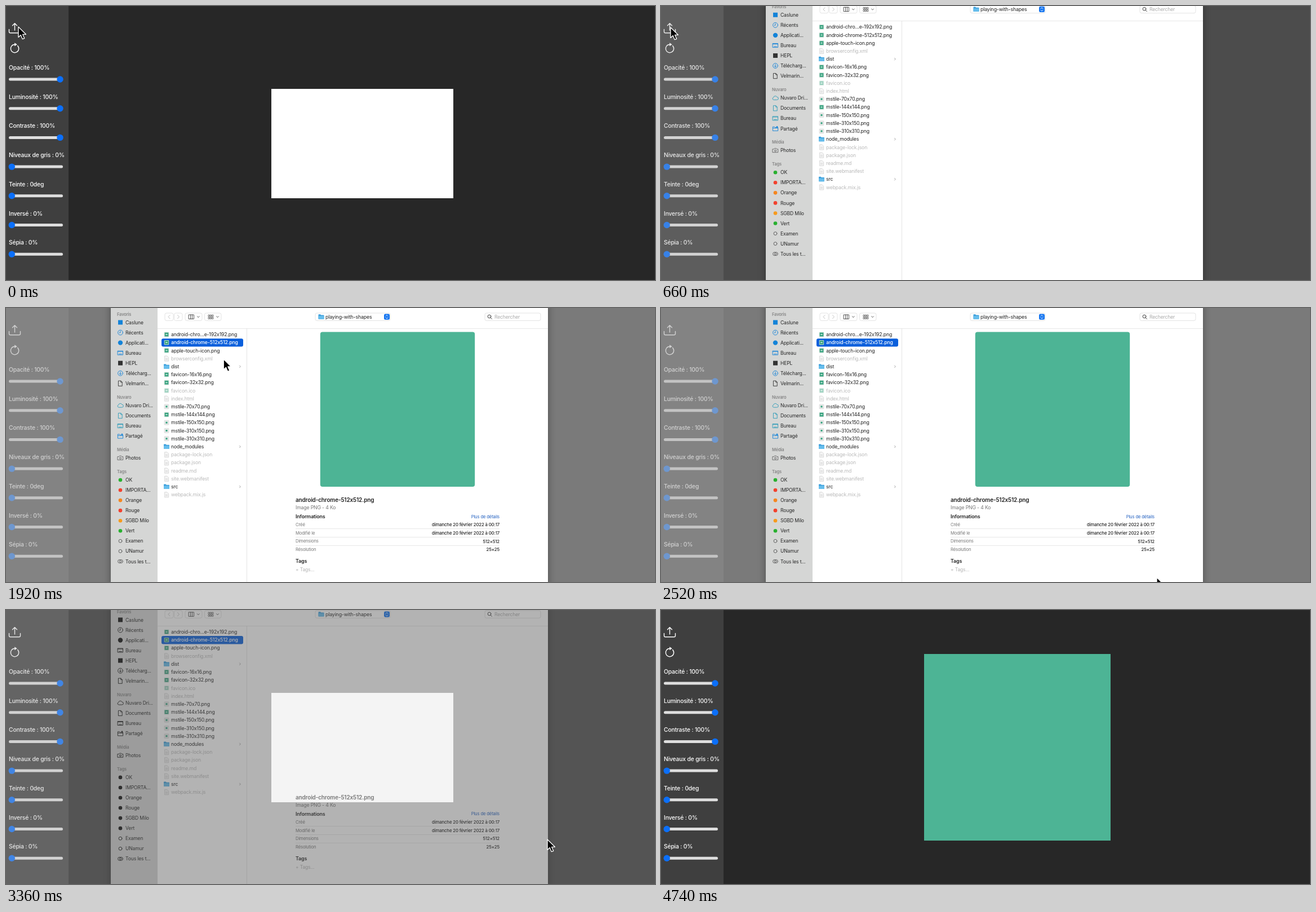
An HTML page that plays this animation: 1152x486 px, repeating every 4800 ms.

```html
<!DOCTYPE html>
<html lang="fr">
<head>
<meta charset="utf-8">
<style>
html, body { margin: 0; width: 100%; height: 100%; overflow: hidden; background: #272727; }
svg { display: block; width: 1152px; height: 486px; font-family: Inter, Roboto, sans-serif; letter-spacing: -.01em; }
text { white-space: pre; }
.line { fill: none; stroke: currentColor; stroke-width: .9; stroke-linecap: round; stroke-linejoin: round; }
.bold .line { stroke-width: 1.4; }
.closing .icon { color: #111 !important; }
</style>
</head>
<body>
<svg id="stage" viewBox="0 0 1152 486"></svg>
<script>
const stage = document.getElementById('stage');

// y is the middle of the capitals
const text = (x, y, s, size, fill, extra = '') =>
  `<text x="${x}" y="${(y + size * .36).toFixed(2)}" font-size="${size}" fill="${fill}" ${extra}>${s}</text>`;
const rect = (x, y, w, h, fill, r = 0, extra = '') =>
  `<rect x="${x}" y="${y}" width="${w}" height="${h}" rx="${r}" fill="${fill}" ${extra}/>`;
const circle = (x, y, r, fill, extra = '') => `<circle cx="${x}" cy="${y}" r="${r}" fill="${fill}" ${extra}/>`;
const line = (d, extra = '') => `<path class="line" d="${d}" ${extra}/>`;
const at = (x, y, s, extra = '') => `<g transform="translate(${x} ${y})" ${extra}>${s}</g>`;
const bold = 'font-weight="600"';
const right = 'text-anchor="end"';

function controls() {
  const sliders = [['Opacité : 100%', 1], ['Luminosité : 100%', 1], ['Contraste : 100%', 1],
    ['Niveaux de gris : 0%', 0], ['Teinte : 0deg', 0], ['Inversé : 0%', 0], ['Sépia : 0%', 0]];
  const icons = line('M5.5 41.5v4q0 2.2 2.2 2.2h15.6q2.2 0 2.2-2.2v-4M15.5 43V31M11.5 34.8l4-4 4 4') +
    line('M20.6 70.4A7.2 7.2 0 1 1 15.5 68.3') +
    '<path d="M15.2 65.3l4.6 2.9-4.6 3z" fill="#fff"/>';
  return rect(0, 0, 111, 486, '#3f3f3f') + `<g class="bold" color="#fff">${icons}</g>` +
    sliders.map(([label, full], i) => {
      const y = 109.3 + i * 51.7;
      return text(5, y, label, 10.3, '#fff', 'font-weight="450"') + rect(5, y + 18.2, 96, 5, '#dedede', 2.5) +
        circle(full ? 96 : 10.3, y + 20.7, 5.7, '#0b6ffa');
    }).join('');
}

const icons = {
  square: rect(-4, -4, 8, 8, 'currentColor'),
  disc: circle(0, 0, 4.2, 'currentColor'),
  dot: circle(0, 0, 3.3, 'currentColor'),
  ring: circle(0, 0, 2.9, 'none', 'class="line"'),
  rings: circle(-1.4, 0, 3, 'none', 'class="line"') + circle(1.4, 0, 3, 'none', 'class="line"'),
  clock: circle(0, 0, 4.4, 'none', 'class="line"') + line('M0-2.6V.4H-2'),
  down: circle(0, 0, 4.4, 'none', 'class="line"') + line('M0-2.4V2.2M-1.8.5L0 2.3 1.8.5'),
  desk: line('M-4.5-3.5h9v7h-9zM-4.5-2.4h9M-2.5 2h5'),
  page: line('M-3.2-4.6h4l2.4 2.5v6.7h-6.4zM.8-4.6v2.5h2.4'),
  cloud: line('M-3 3.2a2.2 2.2 0 0 1-.3-4.3 3.3 3.3 0 0 1 6.2-.6A2.4 2.4 0 0 1 3 3.2z'),
  share: line('M-4.6 3.6v-6.8h3l1 1.2h5.2v5.6zM-4.6-.8h9.2') + circle(3, -3.2, 1.3, 'currentColor'),
  camera: line('M-4.7-2.4h2.2l1-1.3h3l1 1.3h2.2v5.8h-9.4z') + circle(0, .4, 1.6, 'none', 'class="line"')
};

function sidebar() {
  const blue = '#1383d8', teal = '#2b9bb8', dark = '#333', red = '#f2412d', green = '#28b02f', orange = '#f79a1c';
  const groups = [
    [11, 'Favoris', [['square', blue, 'Caslune'], ['clock', blue, 'Récents'], ['disc', blue, 'Applicati...'],
      ['desk', blue, 'Bureau'], ['square', dark, 'HEPL'], ['down', blue, 'Télécharg...'], ['page', dark, 'Velmarin...']]],
    [158.5, 'Nuvaro', [['cloud', teal, 'Nuvaro Dri...'], ['page', teal, 'Documents'], ['desk', teal, 'Bureau'], ['share', blue, 'Partagé']]],
    [251.5, 'Média', [['camera', '#666', 'Photos']]],
    [290.5, 'Tags', [['dot', green, 'OK'], ['dot', red, 'IMPORTA...'], ['dot', '#f5861f', 'Orange'], ['dot', red, 'Rouge'],
      ['dot', orange, 'SGBD Milo'], ['dot', green, 'Vert'], ['ring', '#555', 'Examen'], ['ring', '#555', 'UNamur'],
      ['rings', '#555', 'Tous les t...']]]
  ];
  return rect(186, -40, 83, 580, '#d5d6d5') + groups.map(([y, title, items]) =>
    text(197, y, title, 7.5, '#858585', bold) + items.map(([icon, color, label], i) => {
      const iy = y + 14.5 + i * 18.05;
      return at(203, iy, icons[icon], `class="icon" style="color:${color}"`) + text(212, iy, label, 8.6, '#262626');
    }).join('')).join('');
}

const folder = '<path d="M-5-3.6q0-.8.8-.8h2.8l1.2 1.2h4.4q.8 0 .8.8v5.6q0 .8-.8.8h-8.4q-.8 0-.8-.8z" fill="#3c9fdc"/>' +
  rect(-5, -1.8, 10, 5.8, '#66bdec', .7);
const fileIcons = {
  p: rect(-4.2, -4.2, 8.4, 8.4, '#b9d5ca', 1) + rect(-3.2, -3.2, 6.4, 6.4, '#35a27e') + rect(-1.6, -.9, 3.2, 1.8, '#c6e6da'),
  s: rect(-4, -4, 8, 8, '#e6e9e8', 1, 'stroke="#ccc" stroke-width=".5"') + rect(-1.5, -1.5, 3, 3, '#35a27e'),
  d: '<path d="M-3.4-4.6h4.4l2.6 2.6v6.6h-7z" fill="#f6f6f6" stroke="#ccc" stroke-width=".7"/>' +
    line('M-1.6 0h3.4M-1.6 2h3.4', 'style="color:#d5d5d5"'),
  f: folder
};
fileIcons.i = `<g opacity=".5">${fileIcons.p}</g>`;

const files = ['p android-chro...e-192x192.png', 'p android-chrome-512x512.png', 'p apple-touch-icon.png',
  'd browserconfig.xml', 'f dist', 'p favicon-16x16.png', 'p favicon-32x32.png', 'i favicon.ico', 'd index.html',
  's mstile-70x70.png', 'p mstile-144x144.png', 's mstile-150x150.png', 's mstile-310x150.png', 's mstile-310x310.png',
  'f node_modules', 'd package-lock.json', 'd package.json', 'd readme.md', 'd site.webmanifest', 'f src', 'd webpack.mix.js'];

const fileList = () => files.map((entry, i) => {
  const kind = entry[0], y = 47 + i * 14.21;
  return at(285, y, fileIcons[kind]) +
    text(293, y, entry.slice(2), 8.7, 'di'.includes(kind) ? '#b9b9b9' : '#222') +
    (kind === 'f' ? line(`M414.6 ${y - 1.8}l1.7 1.8-1.7 1.8`, 'style="color:#999"') : '');
}).join('');

function toolbar() {
  const box = (x, w) => rect(x, 9, w, 13.4, '#fff', 3, 'stroke="#dcdcdc" stroke-width=".8"');
  const grid = [0, 1, 2].map(c => [0, 1].map(r => rect(359 + c * 3.3, 12.2 + r * 4.2, 2.4, 3, 'none', .4, 'stroke="#444" stroke-width=".8"')).join('')).join('');
  return box(282, 15) + box(298.5, 14.5) + box(318, 30) + box(352.5, 29.5) + box(549, 133) + box(850, 99) +
    line('M291 12.6l-3 3.1 3 3.1M304.5 12.6l3 3.1-3 3.1', 'style="color:#bbb"') +
    `<g color="#444">${line('M324.5 12h9v7.4h-9zM327.5 12v7.4M330.5 12v7.4M339.4 14.8l1.9 1.9 1.9-1.9M373.6 14.8l1.9 1.9 1.9-1.9')}</g>` + grid +
    at(559.5, 15.7, folder) + text(567, 15.5, 'playing-with-shapes', 8.8, '#222') +
    rect(671, 10.6, 10, 10.2, '#1575f0', 2.4) +
    line('M674 14.5l2-2 2 2M674 16.9l2 2 2-2', 'style="color:#fff"') +
    `<g color="#333">${circle(858, 15, 2.9, 'none', 'class="line"')}${line('M860.2 17.2l2.3 2.3')}</g>` +
    text(867, 15.7, 'Rechercher', 8.6, '#aaa');
}

function details() {
  const rows = [['Créé', 'dimanche 20 février 2022 à 00:17'], ['Modifié le', 'dimanche 20 février 2022 à 00:17'],
    ['Dimensions', '512×512'], ['Résolution', '25×25']];
  return text(514, 340.8, 'android-chrome-512x512.png', 10, '#222', bold) +
    text(514, 354, 'Image PNG - 4 Ko', 8.7, '#777') +
    text(514, 369.6, 'Informations', 8.9, '#222', bold) +
    text(876, 369.8, 'Plus de détails', 7.7, '#2461c0', right) +
    rows.map(([name, value], i) => {
      const y = 384 + i * 14.85;
      return text(514, y, name, 7.7, '#777') + text(876, y, value, 7.8, '#222', 'font-weight="550" ' + right) +
        (i < 3 ? rect(514, y + 7.2, 362, .7, '#ddd') : '');
    }).join('') +
    text(514, 449, 'Tags', 8.9, '#222', bold) + text(514, 464, '+ Tags...', 8.5, '#b5b5b5');
}

const selection = rect(276, 54.2, 145, 14.3, '#0a5fdc', 3) + at(285, 61.2, fileIcons.p) +
  text(293, 61.2, files[1].slice(2), 8.7, '#fff', 'font-weight="500"');

stage.innerHTML = rect(0, 0, 1152, 486, '#272727') + controls() +
  rect(471, 147, 323, 194, '#fff', 0, 'id="blank"') +
  rect(467, 78, 331, 331, '#4db495', 0, 'id="loaded"') +
  rect(0, 0, 1152, 486, '#b2b2b2', 0, 'id="veil"') +
  `<g id="sheet">${rect(186, -40, 776, 580, '#fff', 0, 'style="filter:drop-shadow(0 4px 7px rgba(0,0,0,.35))"')}
  ${sidebar()}${toolbar()}${rect(269, 36, 693, .8, '#e2e2e2')}${rect(427.2, 36, .8, 520, '#dedede')}${fileList()}
  <g id="picked">${selection}</g>
  <g id="preview">${rect(557.8, 42.6, 274.4, 274.4, '#4db495', 4, 'id="thumb"')}${details()}</g></g>
  <path id="cursor" d="M0 0v18.4l4.2-3.9 3.1 7.2 3.4-1.4-3.1-7h5.8z" stroke="#fff" stroke-width="1.3" stroke-linejoin="round"/>`;

const el = id => document.getElementById(id);
const show = (id, on) => el(id).style.display = on ? '' : 'none';
const ramp = (t, a, b) => Math.min(1, Math.max(0, (t - a) / (b - a)));

// time, x, y of the pointer
const path = [[0, 22, 37], [60, 22, 37], [300, 17, 38], [780, 17, 38], [1110, 425, 78], [1170, 425, 78], [1450, 352, 60],
  [1860, 352, 60], [2220, 800, 462], [2520, 880, 478], [2700, 955, 415], [3000, 961, 407], [3480, 961, 407],
  [3780, 655, 342], [3960, 402, 298], [4140, 402, 298], [4560, 330, 500], [4800, 330, 500]];

function pointer(t) {
  const i = path.findIndex(p => p[0] > t);
  const [t0, x0, y0] = path[i - 1], [t1, x1, y1] = path[i];
  const u = (t - t0) / (t1 - t0), k = u * u * (3 - 2 * u);
  return `translate(${x0 + (x1 - x0) * k} ${y0 + (y1 - y0) * k})`;
}

function draw(now) {
  const t = now % 4800;
  const closing = t > 3284;
  const open = closing ? 1 - ramp(t, 3284, 3484) : ramp(t, 535, 770);
  el('veil').setAttribute('opacity', .596 * open ** 1.3);
  el('sheet').setAttribute('opacity', closing ? open ** 1.2 : Math.min(1, open * 2));
  el('sheet').setAttribute('transform', `translate(0 ${-21 * (1 - open)})`);
  stage.classList.toggle('closing', closing);
  show('sheet', open > 0);
  show('picked', t >= 1500);
  show('preview', t >= 1740);
  show('thumb', !closing);
  show('blank', t < 3600);
  show('loaded', t >= 3600);
  el('cursor').setAttribute('transform', pointer(t));
  requestAnimationFrame(draw);
}
requestAnimationFrame(draw);
</script>
</body>
</html>
```
